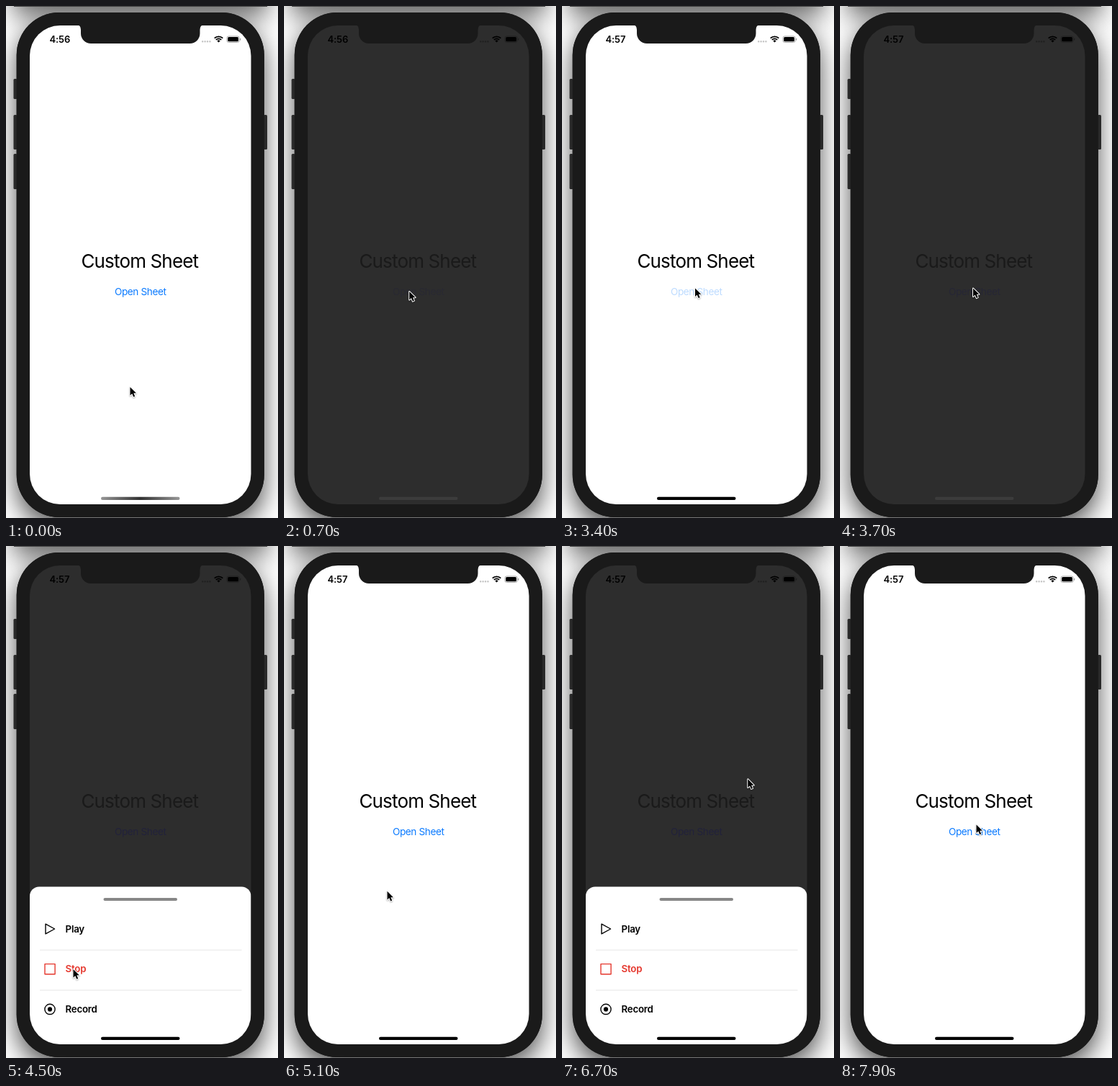
Write an HTML page with a canvas that moves like this. It is 378x710 px and loops after 8 s.

```html
<!DOCTYPE html>
<html lang="en">
<head>
<meta charset="utf-8">
<title>Custom Sheet</title>
<style>
  html, body { margin: 0; width: 100%; height: 100%; overflow: hidden; background: #fff; }
  canvas { display: block; width: 378px; height: 710px; }
</style>
</head>
<body>
<canvas id="stage" width="378" height="710"></canvas>
<script>
const ctx = document.getElementById('stage').getContext('2d');
const LOOP = 8000, STEP = 100;
const PRESS = 200, RISE_DELAY = 100, RISE = 200, REST = 150;
const FONT = 'Inter, "Liberation Sans", sans-serif';
const BEZEL = '#1a1a1a', RED = '#e5382e';
const SCREEN = { x: 33, y: 27, w: 307.5, h: 664, r: 42 };
const SHEET_TOP = 472.5, ROW = 55.7;

const point = (x, y) => ({ x, y });
const START = point(172.5, 528.5), END = point(189.5, 386.5);

// Each visit: tap the link, wait, move along the picks, close the sheet
const visits = [
  { open: 700, leave: 1500, arrive: 2400, close: 2500,
    tap: point(174.2, 396), picks: [point(98, 530.5)] },
  { open: 3600, leave: 3800, arrive: 4400, close: 4600,
    tap: point(185, 391.5), picks: [point(93.5, 587)] },
  { open: 5600, leave: 5800, arrive: 7100, close: 7400,
    tap: point(183.2, 393), picks: [point(258.5, 371), point(258.5, 324), point(245.5, 284.5)] }
];

const clamp = v => Math.max(0, Math.min(1, v));
const lerp = (a, b, k) => a + (b - a) * k;
const smooth = k => k * k * (3 - 2 * k);
const grey = v => `rgb(${v},${v},${v})`;

// Pointer moves, with several picks sharing their time evenly
function planMoves() {
  const moves = [];
  let pos = START, from = 0;
  const go = (to, start, end) => {
    moves.push({ a: pos, b: to, start, end });
    pos = to;
  };
  for (const v of visits) {
    go(v.tap, from, v.open - PRESS);
    const leg = (v.arrive - v.leave) / v.picks.length;
    v.picks.forEach((p, i) => go(p, v.leave + i * leg, v.leave + (i + 1) * leg));
    from = v.close + REST;
  }
  go(END, from, LOOP - STEP);
  return moves;
}
const moves = planMoves();

function pointerAt(t) {
  const m = moves.findLast(move => t >= move.start);
  const k = smooth(clamp((t - m.start) / (m.end - m.start)));
  return point(lerp(m.a.x, m.b.x, k), lerp(m.a.y, m.b.y, k));
}

function box(x, y, w, h, r, fill) {
  ctx.beginPath();
  ctx.roundRect(x, y, w, h, r);
  ctx.fillStyle = fill;
  ctx.fill();
}

function label(str, x, y, size, weight, color, spacing = 0, align = 'left') {
  ctx.font = `${weight} ${size}px ${FONT}`;
  ctx.letterSpacing = spacing + 'px';
  ctx.textAlign = align;
  ctx.fillStyle = color;
  ctx.fillText(str, x, y);
}

function withShadow(alpha, blur, dy, draw) {
  ctx.save();
  ctx.shadowColor = `rgba(0,0,0,${alpha})`;
  ctx.shadowBlur = blur;
  ctx.shadowOffsetY = dy;
  draw();
  ctx.restore();
}

function drawBody() {
  const body = () => box(14.7, 9, 344.1, 700, SCREEN.r + 17, BEZEL);
  const button = (x, y, h) => box(x, y, 5, h, 1.5, '#292929');
  ctx.fillStyle = '#fff';
  ctx.fillRect(0, 0, 378, 710);
  withShadow(0.6, 34, 13, () => box(11, -80, 352, 81, 0, '#444'));
  withShadow(0.68, 34, 14, body);
  button(10.5, 101, 28);
  button(10.5, 151, 48);
  button(10.5, 205, 49);
  button(358, 151, 48);
  body();
}

function drawNotch() {
  ctx.beginPath();
  ctx.moveTo(99, 26);
  ctx.quadraticCurveTo(104, 27, 104, 33);
  ctx.arcTo(104, 52, 118, 52, 14);
  ctx.arcTo(269.5, 52, 269.5, 38, 14);
  ctx.lineTo(269.5, 33);
  ctx.quadraticCurveTo(269.5, 27, 274.5, 26);
  ctx.fillStyle = BEZEL;
  ctx.fill();
}

function drawStatus(t, dim) {
  const faint = dim ? '#212121' : '#a4a4a4';
  label(t < 1200 ? '4:56' : '4:57', 60.5, 51, 13, 600, '#000', -0.1);
  for (let i = 0; i < 4; i++) box(272 + i * 3.4, 48, 2.4, 2.4, 1, dim ? faint : '#c6c6c6');

  const from = -Math.PI * 0.75, to = -Math.PI * 0.25;
  ctx.strokeStyle = ctx.fillStyle = '#000';
  ctx.lineWidth = 1.8;
  for (const r of [8.2, 5.2]) {
    ctx.beginPath();
    ctx.arc(295.5, 50.5, r, from, to);
    ctx.stroke();
  }
  ctx.beginPath();
  ctx.moveTo(295.5, 50.5);
  ctx.arc(295.5, 50.5, 3, from, to);
  ctx.fill();

  ctx.beginPath();
  ctx.roundRect(306.9, 41.9, 17.4, 8.6, 2.6);
  ctx.strokeStyle = faint;
  ctx.lineWidth = 0.9;
  ctx.stroke();
  box(308.2, 43.1, 14.8, 6.2, 1.5, '#000');
  box(325, 44.7, 1.2, 3, 0.6, faint);
}

function drawPage(t, dim, linkAlpha) {
  box(SCREEN.x, SCREEN.y, SCREEN.w, SCREEN.h, SCREEN.r, dim ? '#2d2d2d' : '#fff');
  label('Custom Sheet', 185.8, 362.5, 26, 400, dim ? '#1a1a1a' : '#000', -0.85, 'center');
  ctx.globalAlpha = linkAlpha;
  label('Open Sheet', 186.7, 401, 13.6, 400, dim ? '#22223b' : '#0a7aff', -0.4, 'center');
  ctx.globalAlpha = 1;
  drawStatus(t, dim);
}

// Icons are drawn around the middle of their row
function playIcon() {
  ctx.beginPath();
  ctx.moveTo(-6, -6.8);
  ctx.lineTo(6.6, 0);
  ctx.lineTo(-6, 6.8);
  ctx.closePath();
  ctx.stroke();
}

function stopIcon() {
  ctx.strokeRect(-7, -7.1, 14.1, 14.1);
}

function recordIcon() {
  ctx.beginPath();
  ctx.arc(0, 0, 7.1, 0, Math.PI * 2);
  ctx.stroke();
  box(-3.1, -3.1, 6.2, 6.2, 3.1, '#000');
}

const rows = [
  { name: 'Play', color: '#000', icon: playIcon },
  { name: 'Stop', color: RED, icon: stopIcon },
  { name: 'Record', color: '#000', icon: recordIcon }
];

function drawRow({ name, color, icon }, i) {
  const y = 531 + i * ROW;
  if (i) box(47, y - 27, 280.5, 1, 0, '#e6e6e6');
  ctx.save();
  ctx.translate(61, y);
  ctx.lineWidth = 1.4;
  ctx.lineJoin = 'round';
  ctx.strokeStyle = color;
  icon();
  ctx.restore();
  label(name, 82.6, y + 4.7, 13.3, 600, color, -0.25);
}

function drawSheet(rise) {
  ctx.save();
  ctx.beginPath();
  ctx.roundRect(SCREEN.x, SCREEN.y, SCREEN.w, SCREEN.h, SCREEN.r);
  ctx.clip();
  ctx.translate(0, (1 - rise) * (SCREEN.y + SCREEN.h - SHEET_TOP));
  box(SCREEN.x, SHEET_TOP, SCREEN.w, 240, [13, 13, 0, 0], '#fff');
  box(135.5, 488, 102.5, 4, 2, '#878787');
  rows.forEach(drawRow);
  ctx.restore();
}

// The home bar settles to black once it lies on white
function drawHome(bare, settle) {
  let fill = '#3c3c3c';
  if (!bare) {
    const edge = grey(Math.round(150 * (1 - settle)));
    const middle = grey(Math.round(50 * (1 - settle)));
    fill = ctx.createLinearGradient(132, 0, 241, 0);
    fill.addColorStop(0, edge);
    fill.addColorStop(0.5, middle);
    fill.addColorStop(1, edge);
  }
  box(132, 680.8, 109.5, 4.2, 2.1, fill);
}

function drawPointer({ x, y }) {
  ctx.save();
  ctx.translate(x, y);
  ctx.beginPath();
  ctx.moveTo(0, 0);
  ctx.lineTo(0, 11.6);
  ctx.lineTo(2.7, 9.1);
  ctx.lineTo(4.7, 13.6);
  ctx.lineTo(6.7, 12.7);
  ctx.lineTo(4.8, 8.3);
  ctx.lineTo(8.4, 8.3);
  ctx.closePath();
  ctx.lineJoin = 'round';
  ctx.lineWidth = 2;
  ctx.strokeStyle = '#fff';
  withShadow(0.3, 2, 1, () => ctx.stroke());
  ctx.fillStyle = '#000';
  ctx.fill();
  ctx.restore();
}

function render(t) {
  const shown = visits.find(v => t >= v.open && t < v.close);
  const pressed = visits.some(v => t >= v.open - PRESS && t < v.open);
  const age = shown ? t - shown.open : 0;
  const rise = 1 - (1 - clamp((age - RISE_DELAY) / RISE)) ** 2;

  let linkAlpha = pressed ? 0.27 : 1;
  if (shown) linkAlpha = lerp(0.35, 1, clamp(age / 300));
  const settle = shown ? clamp((age - 300) / 500) : t < visits[0].open ? 0 : 1;

  drawBody();
  drawPage(t, !!shown, linkAlpha);
  drawNotch();
  if (rise > 0) drawSheet(rise);
  drawHome(shown && rise === 0, settle);
  drawPointer(pointerAt(t));
}

function tick(now) {
  render(Math.floor((now % LOOP) / STEP) * STEP);
  requestAnimationFrame(tick);
}
requestAnimationFrame(tick);
</script>
</body>
</html>
```
